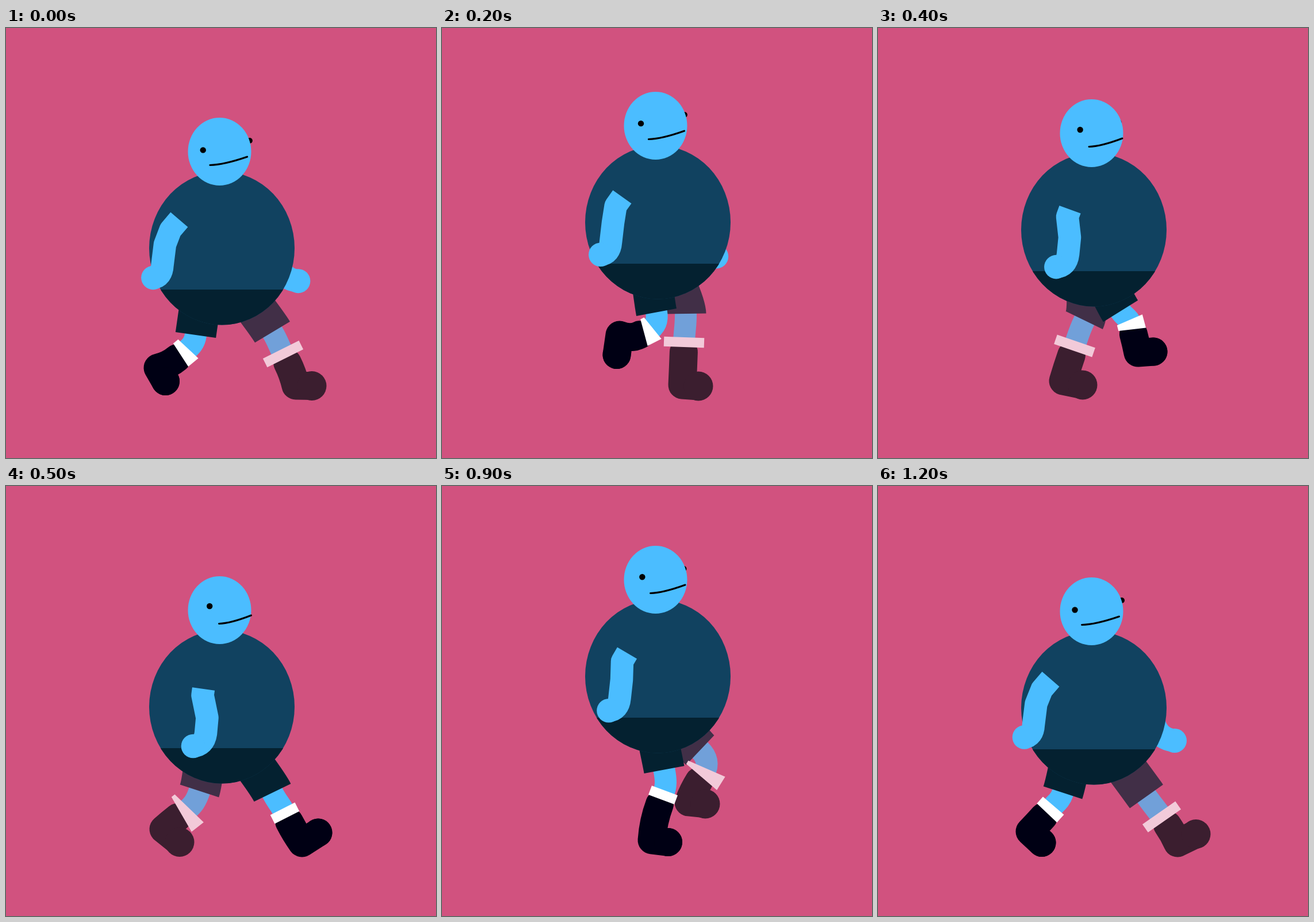
Recreate the animation shown at these times as an HTML page with a canvas. Size 748 px wide and 748 px high, loop 1.3 s.

```html
<!DOCTYPE html>
<html lang="en">
<head>
<meta charset="utf-8">
<title>Walk cycle</title>
<style>
  html, body { margin: 0; width: 100%; height: 100%; overflow: hidden; background: #d1527f; }
  canvas { display: block; width: 100vw; height: 100vh; object-fit: contain; }
</style>
</head>
<body>
<canvas id="stage" width="748" height="748"></canvas>
<script>
const ctx = document.getElementById('stage').getContext('2d');
const STEPS = 13, STEP_MS = 100;
const BG = '#d1527f', SKIN = '#4bbdff', SHIRT = '#114260', SHORTS = '#042130';

// Height of the head's top edge at each step
const bob = [156, 131, 111, 102, 124, 157, 159, 135, 117, 104, 101, 125, 159];

// Arm swing and head turn: step, amount
const swing = [[0, .02], [2, .3], [4, .78], [5, 1], [7, .97], [9, .5], [12, 0]];

// Legs: step, hem x, hem y below the head top, hem angle,
// cuff x, y, angle, wedge, ankle x, y, toe x, y
const near = {
  skin: SKIN, shorts: SHORTS, boot: '#000014', cuff: '#ffffff', cuffWidth: 48, toe: 24.5,
  keys: [
    [0, 330, 378, 8, 310.5, 563.5, 50, 14, 264, 591, 277.5, 614.5],
    [2, 373, 383.5, -10.5, 359, 526, 63, 24, 309, 534, 304, 568.5],
    [3, 413, 364, -35, 420, 504, 28, 20, 385, 547, 408, 560],
    [4, 422, 368.5, -32, 440, 516, -15, 17, 452, 565, 479, 563],
    [5, 463.5, 376.5, -26, 485, 569, -27, 0, 515, 621, 543, 603],
    [7, 435.5, 381.5, -24, 446.5, 559, 9, 8, 442, 621, 484, 623.5],
    [9, 386.5, 389.5, -10.5, 384.5, 537.5, 20.5, 0, 365, 616, 393.5, 619.5],
    [12, 321.5, 374.5, 18, 299.5, 562.5, 42, 3, 264, 601, 285, 620.5]
  ]
};
const far = {
  skin: '#71a0d9', shorts: '#412f47', boot: '#3b1e2f', cuff: '#f2cad9', cuffWidth: 70, toe: 25.5,
  keys: [
    [0, 463.5, 373, -31, 482, 567, -26.5, 0, 504, 622, 532, 622.5],
    [2, 424, 386, -1, 421, 546.5, 2, 0, 418, 621, 446, 623],
    [4, 359, 384.5, 26, 342, 553, 19, 0, 322, 614, 356, 621],
    [5, 336.5, 373.5, 18, 312, 566, 52, 16, 274, 597, 302, 619.5],
    [6, 322, 369, 28, 288, 558, 60, 19, 242, 583, 264, 608],
    [7, 347.5, 377, 20, 323, 540, 78, 20, 283, 544, 288, 590.5],
    [9, 449, 355.5, -46.5, 456, 499, 32, 17, 429, 550, 458, 553],
    [10, 447, 361, -44, 463, 501, 2, 10, 465, 553, 494, 550],
    [12, 467, 381, -35.5, 493.5, 575.5, -35, 0, 521, 621, 553, 605.5]
  ]
};

// Smooth cyclic curve through every column of the keys
function sample(keys, t) {
  const n = keys.length;
  const at = i => keys[(i + n) % n];
  const time = i => at(i)[0] + Math.floor(i / n) * STEPS;
  let i = n - 1;
  while (keys[i][0] > t) i--;
  const span = time(i + 1) - time(i), u = (t - time(i)) / span;
  return at(i).slice(1).map((a, k) => {
    const v = j => at(j)[k + 1];
    const slope = j => (v(j + 1) - v(j - 1)) / (time(j + 1) - time(j - 1));
    const b = v(i + 1), m0 = slope(i) * span, m1 = slope(i + 1) * span;
    return a + u * (m0 + u * (3 * (b - a) - 2 * m0 - m1 + u * (2 * (a - b) + m0 + m1)));
  });
}

const down = deg => {
  const r = deg * Math.PI / 180;
  return [-Math.sin(r), Math.cos(r)];
};
const along = ([x, y], [dx, dy], k) => [x + dx * k, y + dy * k];

function ellipse(x, y, rx, ry, color) {
  ctx.fillStyle = color;
  ctx.beginPath();
  ctx.ellipse(x, y, rx, ry, 0, 0, 2 * Math.PI);
  ctx.fill();
}
const disc = (x, y, r, color) => ellipse(x, y, r, r, color);

function limb(color, width, cap, trace) {
  ctx.strokeStyle = color;
  ctx.lineWidth = width;
  ctx.lineCap = cap;
  ctx.lineJoin = 'round';
  ctx.beginPath();
  trace(ctx);
  ctx.stroke();
}

function drawLeg(leg, step, top) {
  const [hx, hy, hemAngle, cx, cy, cuffAngle, wedge, ax, ay, tx, ty] = sample(leg.keys, step);
  const hem = [hx, hy + top], cuff = [cx, cy];
  const hemDown = down(hemAngle), cuffDown = down(cuffAngle);
  const bend = Math.hypot(cx - hem[0], cy - hem[1]) * .4;

  limb(leg.skin, 38, 'butt', c => {
    c.moveTo(...along(hem, hemDown, -8));
    c.lineTo(...hem);
    c.bezierCurveTo(...along(hem, hemDown, bend), ...along(cuff, cuffDown, -bend), ...cuff);
  });

  const start = along(cuff, cuffDown, 17);
  const shin = Math.hypot(ax - start[0], ay - start[1]) * .5;
  limb(leg.boot, 49, 'round', c => {
    c.moveTo(...start);
    c.quadraticCurveTo(...along(start, cuffDown, shin), ax, ay);
    c.lineTo(tx, ty);
  });
  disc(tx, ty, leg.toe, leg.boot);

  limb(leg.shorts, 71, 'butt', c => {
    c.moveTo(352, top + 225);
    c.quadraticCurveTo(...along(hem, hemDown, -28), ...hem);
  });

  // The cuff's two edges tilt apart when the knee bends
  const edge = side => {
    const mid = along(cuff, cuffDown, side * 8.5);
    const [sx, sy] = down(cuffAngle + side * wedge / 2);
    const half = leg.cuffWidth / 2 * side;
    return [along(mid, [sy, -sx], half), along(mid, [sy, -sx], -half)];
  };
  ctx.fillStyle = leg.cuff;
  ctx.beginPath();
  [...edge(-1), ...edge(1)].forEach(p => ctx.lineTo(...p));
  ctx.fill();
}

function drawFarArm(h, top) {
  const x = 516 - 80 * Math.pow(h, .6), y = top + 284 + 8 * h;
  limb(SKIN, 40, 'round', c => {
    c.moveTo(x - 38, y - 45);
    c.quadraticCurveTo(x - 35, y - 4, x, y);
  });
  disc(x, y, 21, SKIN);
}

function drawNearArm(h, top) {
  const x = 254.5 + 71 * h, y = top + 278 + 17.5 * h;
  limb(SKIN, 39.5, 'butt', c => {
    c.moveTo(300.5 + 43 * h, top + 177 + 19 * h);
    c.lineTo(285 + 57 * h, top + 195 + 12 * h);
    c.lineTo(275 + 75 * h, top + 220 + 26 * h);
    c.lineTo(x + 16 + 6 * h, y - 22);
    c.quadraticCurveTo(x + 15 + 4 * h, y - 1, x, y);
  });
  disc(x, y, 20.8, SKIN);
}

function drawBody(top) {
  ellipse(375.5, top + 227, 126.5, 133.5, SHIRT);
  ctx.save();
  ctx.beginPath();
  ctx.rect(0, top + 299, 748, 200);
  ctx.clip();
  ellipse(375.5, top + 227, 126.5, 133.5, SHORTS);
  ctx.restore();
}

function drawHead(h, top) {
  disc(424 - 7 * h, top + 40, 5, '#000');
  ellipse(371.5, top + 59, 55, 59, SKIN);
  disc(342.5 + 11.7 * h, top + 56.5 - 4.5 * h, 5.2, '#000');
  limb('#000', 3, 'round', c => {
    const x = 354.5 + 16 * h;
    c.moveTo(x, top + 82.5);
    c.quadraticCurveTo(x + 24 - 4 * h, top + 82, 419.5 + 7 * h, top + 68);
  });
}

function draw() {
  const step = Math.floor(performance.now() / STEP_MS) % STEPS;
  const top = bob[step];
  const h = Math.max(0, sample(swing, step)[0]);
  ctx.fillStyle = BG;
  ctx.fillRect(0, 0, 748, 748);
  drawFarArm(h, top);
  drawLeg(far, step, top);
  drawLeg(near, step, top);
  drawBody(top);
  drawHead(h, top);
  drawNearArm(h, top);
  requestAnimationFrame(draw);
}
draw();
</script>
</body>
</html>
```
